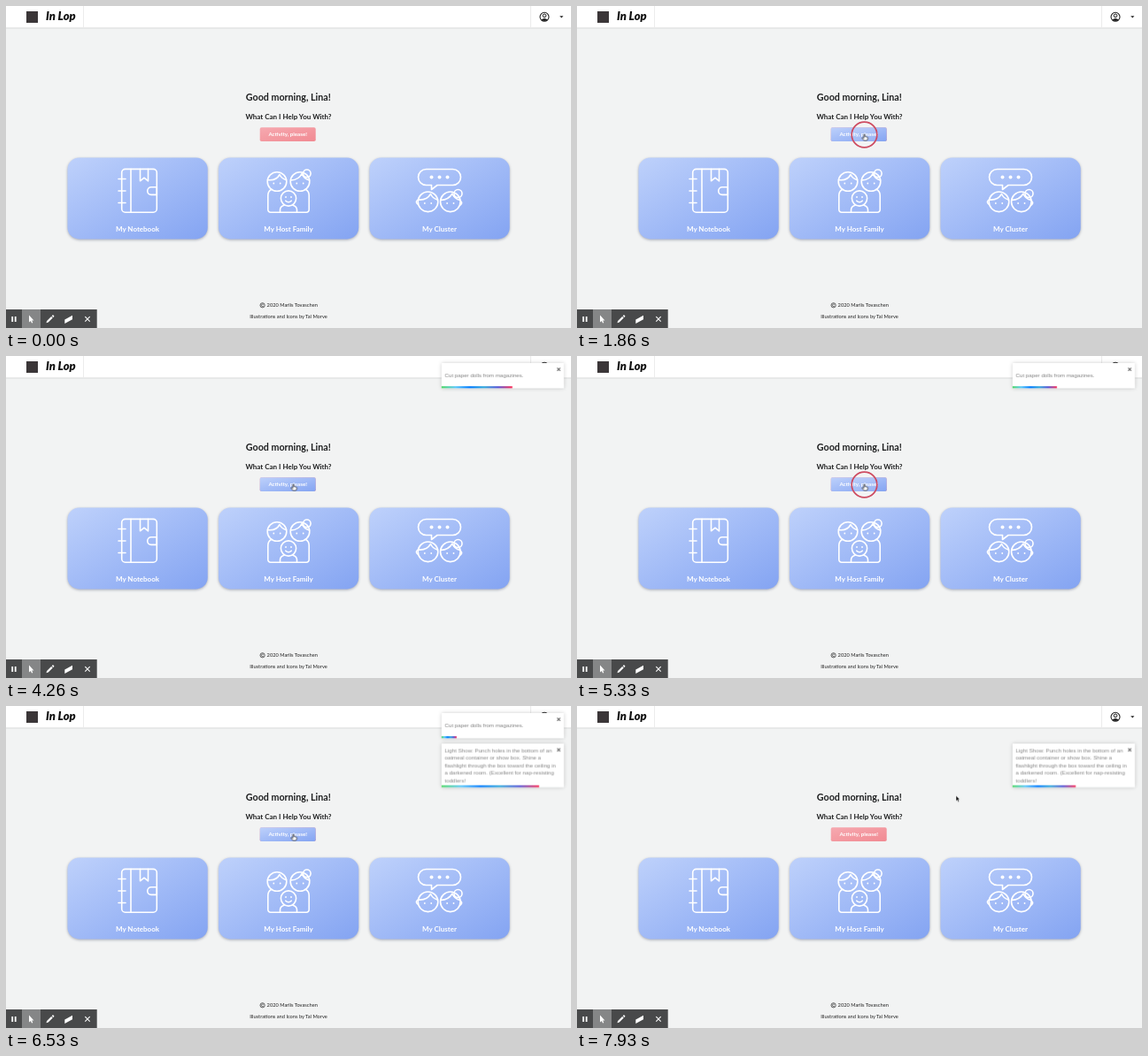
Animation of 638x364 px, one loop 8000 ms. Source, as an HTML page:

```html
<!DOCTYPE html>
<html lang="en">
<head>
<meta charset="utf-8">
<title>Dashboard</title>
<style>
  html, body { margin: 0; width: 100%; height: 100%; overflow: hidden; background: #f2f3f3; }
  svg { display: block; width: 638px; height: 364px; }
  text { font-family: Lato, sans-serif; }
  .bold { font-weight: 700; }
  .mid { text-anchor: middle; }
  .h2 { font-size: 10.7px; fill: #1d1e1f; }
  .h3 { font-size: 8px; fill: #1d1e1f; }
  .label { font-size: 7.97px; fill: #fff; }
  .small { font-size: 5.7px; fill: #222; }
  .brand { font-size: 13px; font-weight: 900; font-style: italic; fill: #111; }
  .card { filter: drop-shadow(0 1px 1.6px rgba(60, 70, 100, .42)); }
  .icon { fill: none; stroke: #fff; stroke-width: 1.6; stroke-linecap: round; stroke-linejoin: round; }
  .dot { fill: #fff; stroke: none; }
  .toast { filter: drop-shadow(0 .6px 2px rgba(0, 0, 0, .2)); }
  .toast text { font-family: "Liberation Sans", Arial, sans-serif; font-size: 6.2px; fill: #858585; }
  .toast path { stroke: #777; stroke-width: 1.3; }
</style>
</head>
<body>
<svg viewBox="0 0 638 364">
  <defs>
    <linearGradient id="blue" x1="0" y1="0" x2="1" y2="1">
      <stop stop-color="#bed1fb"/><stop offset="1" stop-color="#84a4f2"/>
    </linearGradient>
    <linearGradient id="pink" x1="0" y1="0" x2="1" y2="1">
      <stop stop-color="#f6a9b0"/><stop offset="1" stop-color="#f18a92"/>
    </linearGradient>
    <linearGradient id="rainbow">
      <stop stop-color="#4cd964"/><stop offset=".2" stop-color="#5ac8fa"/>
      <stop offset=".4" stop-color="#007aff"/><stop offset=".6" stop-color="#34aadc"/>
      <stop offset=".8" stop-color="#5856d6"/><stop offset="1" stop-color="#ff2d55"/>
    </linearGradient>
  </defs>

  <rect width="638" height="364" fill="#f2f3f3"/>

  <g id="header">
    <rect y="24" width="638" height="1.6" fill="#e0e1e1"/>
    <rect width="638" height="24.3" fill="#fff"/>
    <path d="M87.5 0V24M592.5 0V24" stroke="#e8e8e8" stroke-width=".8"/>
    <rect x="23" y="6" width="13" height="13" fill="#3b3638"/>
    <text class="brand" x="45" y="16.4">In Lop</text>
    <g fill="none" stroke="#222">
      <circle cx="608" cy="12.3" r="5" stroke-width="1.1"/>
      <circle cx="608" cy="10.9" r="1.9" stroke-width="1"/>
      <path d="M604.3 15.6Q608 12.4 611.7 15.6Q608 18.6 604.3 15.6Z" fill="#222" stroke="none"/>
    </g>
    <path d="M625.2 11.3h4.2l-2.1 2.2z" fill="#222"/>
  </g>

  <text class="h2 bold mid" x="318.8" y="106.8">Good morning, Lina!</text>
  <text class="h3 bold mid" x="319" y="128.4">What Can I Help You With?</text>

  <rect x="286.7" y="137.2" width="63" height="15.8" rx="1.8" fill="url(#pink)"/>
  <rect id="hover" x="286.7" y="137.2" width="63" height="15.8" rx="1.8" fill="url(#blue)"/>
  <text class="bold mid" x="318.2" y="147.3" font-size="6.2" fill="#fff">Activity, please!</text>

  <g id="cards"></g>

  <g class="icon">
    <rect x="130.7" y="184.4" width="39.6" height="48.8" rx="4"/>
    <path d="M141 184.4V233.2M127 195.5h8M127 209h8M127 222.500h8M151.500 184.400v13.400l4.500-3.600 4.500 3.600v-13.400M170.300 204.800h-6.300a4.300 4.300 0 0 0 0 8.600h6.300z"/>
  </g>

  <g class="icon">
    <circle cx="306" cy="198.500" r="10.800"/>
    <path d="M295.500 196.500Q305 198 309 190.500Q311 195 316.500 196.500"/>
    <circle cx="332" cy="198.500" r="10.800"/>
    <circle cx="339.800" cy="189.300" r="4.300"/>
    <path d="M321.500 197Q331 196.500 334 189.500Q336 195 342.600 197"/>
    <path d="M299.500 207.500Q295.800 209.500 295.800 214V230.200a3 3 0 0 0 3 3H339.200a3 3 0 0 0 3-3V214Q342.200 209.500 338.500 207.500"/>
    <circle cx="319" cy="217.500" r="8.600"/>
    <path d="M309.500 233v-2.500q0-4 4.500-5.300M328.500 233v-2.500q0-4-4.500-5.300M315.800 220.200q3.200 3.200 6.400 0"/>
    <g class="dot">
      <circle cx="302.300" cy="200.500" r=".9"/><circle cx="309.700" cy="200.500" r=".9"/>
      <circle cx="328.300" cy="200.500" r=".9"/><circle cx="335.700" cy="200.500" r=".9"/>
      <circle cx="316" cy="216" r=".9"/><circle cx="322" cy="216" r=".9"/>
    </g>
  </g>

  <g class="icon">
    <path d="M474.500 184.500H504.500a9 9 0 0 1 0 18H487l-6.500 5v-5h-6a9 9 0 0 1 0-18z"/>
    <circle cx="476.500" cy="221.300" r="11.300"/>
    <path d="M465.500 219Q475 220 479.500 212.500Q482 218 487.500 219M464.500 219.500q-2.500 2.300 .500 4.500"/>
    <circle cx="501.800" cy="221.300" r="11.300"/>
    <circle cx="510.500" cy="212" r="4.500"/>
    <path d="M490.800 219.500Q500 219 504 212Q506 218 513 219.500M513.500 220.500q2.500 2.300-.500 4.500"/>
    <g class="dot">
      <circle cx="480.500" cy="193.500" r="2"/><circle cx="489.500" cy="193.500" r="2"/><circle cx="498.500" cy="193.500" r="2"/>
      <circle cx="472.800" cy="223" r=".9"/><circle cx="480.200" cy="223" r=".9"/>
      <circle cx="498.100" cy="223" r=".9"/><circle cx="505.500" cy="223" r=".9"/>
    </g>
  </g>

  <g fill="none" stroke="#222" stroke-width=".7">
    <circle cx="289.600" cy="338.300" r="2.600"/>
    <path d="M290.700 337.400a1.300 1.300 0 1 0 0 1.800"/>
  </g>
  <text class="small" x="294.600" y="340.300">2020 Marlis Tovaschen</text>
  <text class="small mid" x="319" y="353.300">Illustrations and Icons by Tal Morve</text>

  <g id="toasts"></g>

  <circle id="ring" cx="324.500" cy="145.500" r="14.300" fill="#fff" fill-opacity=".12" stroke="#cd4a60" stroke-width="1.700"/>

  <g id="pointer">
    <path id="arrow" d="M0 0V6.300L1.500 5 2.500 7.200 3.600 6.700 2.600 4.600H4.500Z" fill="#111" stroke="#fff" stroke-width=".5"/>
    <path id="hand" d="M-.7 .6Q0-.5 .7 .6V3Q1.500 2.500 2 3.200Q2.700 2.800 3.100 3.500Q3.900 3.300 3.900 4.200Q3.900 6.300 2.900 7.200H-.500L-2.500 4.700Q-2.600 3.600-1.600 4L-.7 4.700Z" fill="#fff" stroke="#222" stroke-width=".7"/>
  </g>

  <g id="toolbar">
    <rect y="343" width="102.700" height="21" fill="#48494a"/>
    <rect x="18" y="343" width="21" height="21" fill="#858687"/>
    <g fill="#fff">
      <path d="M6.300 351h1.800v6h-1.800zM9.800 351h1.800v6h-1.800z"/>
      <path d="M26 349.500v8l1.900-1.600 1.200 2.700 1.200-.5-1.200-2.600h2.300z"/>
      <path d="M45.500 358.200l.6-2.300 5-5 1.700 1.700-5 5zM51.700 350.300l.8-.8q.5-.4 1 0l.7.700q.4.500 0 1l-.8.800z"/>
      <path d="M66.300 354.500l8.700-4.700v4.400l-8.700 4.700z"/>
    </g>
    <path d="M89.300 351.200l5.400 5.400M94.700 351.200l-5.400 5.400" stroke="#fff" stroke-width="1.100"/>
  </g>
</svg>

<script>
const LOOP = 8000;
const LIFE = 5000;
const BOUNCE = 750;
const OUT = 'cubic-bezier(.215,.61,.355,1)';
const HARD = 'steps(1)';
const $ = id => document.getElementById(id);

// steps: [ms, style, easing to the next step]
function play(el, steps) {
  const frames = steps.map(([ms, style, easing = 'linear']) => ({ ...style, offset: ms / LOOP, easing }));
  frames.push({ ...steps[steps.length - 1][1], offset: 1 });
  el.animate(frames, { duration: LOOP, iterations: Infinity });
}

const at = (x, y) => ({ transform: `translate(${x}px, ${y}px)` });
const slide = (x, opacity = 1) => ({ transform: `translateX(${x}px)`, opacity });

// Shows an element only within the given [from, to] spans
function showDuring(el, spans) {
  const steps = spans.flatMap(([from, to]) => [[from, { opacity: 1 }, HARD], [to, { opacity: 0 }, HARD]]);
  play(el, [[0, { opacity: 0 }, HARD], ...steps]);
}

$('cards').innerHTML = ['My Notebook', 'My Host Family', 'My Cluster'].map((name, i) => {
  const x = 69.5 + i * 170.5;
  return `<rect class="card" x="${x}" y="171.600" width="158.200" height="91.800" rx="13" fill="url(#blue)"/>
    <text class="label bold mid" x="${x + 79}" y="254.800">${name}</text>`;
}).join('');

function addToast(y, height, textY, lines, start) {
  const holder = document.createElementNS('http://www.w3.org/2000/svg', 'g');
  holder.setAttribute('transform', `translate(491.8 ${y})`);
  const text = lines.map((line, i) => `<text x="3.500" y="${textY + i * 8.45}">${line}</text>`).join('');
  holder.innerHTML = `<g class="toast">
    <rect width="138.200" height="${height}" rx=".5" fill="#fff"/>${text}
    <path d="M130.600 5.400l3.400 3.400M134 5.400l-3.400 3.400"/>
    <rect class="bar" y="${height - 2.2}" width="138.200" height="2.200" fill="url(#rainbow)"/>
  </g>`;
  $('toasts').append(holder);

  const end = start + LIFE;
  const steps = [
    [0, slide(1329, 0)],
    [start, slide(1329, 0), OUT],
    [start + BOUNCE * .6, slide(-11.1), OUT],
    [start + BOUNCE * .75, slide(4.4), OUT],
    [start + BOUNCE * .9, slide(-2.2), OUT],
    [start + BOUNCE, slide(0)]
  ];
  const drain = [[0, { transform: 'scaleX(1)' }], [start, { transform: 'scaleX(1)' }]];
  if (end < LOOP) {
    steps.push(
      [end, slide(0), 'ease'],
      [end + BOUNCE * .2, slide(-8.9), 'ease'],
      [end + BOUNCE, slide(886, 0)]
    );
    drain.push([end, { transform: 'scaleX(0)' }]);
  } else {
    const left = 1 - (LOOP - start) / LIFE;
    drain.push([LOOP, { transform: `scaleX(${left})` }]);
  }
  play(holder.firstElementChild, steps);
  play(holder.querySelector('.bar'), drain);
}

addToast(8, 28.4, 16.4, ['Cut paper dolls from magazines.'], 2148);
addToast(42.5, 49.4, 9.9, [
  'Light Show: Punch holes in the bottom of an',
  'oatmeal container or show box. Shine a',
  'flashlight through the box toward the ceiling in',
  'a darkened room. (Excellent for nap-resisting',
  'toddlers!'
], 5516);

play($('pointer'), [
  [0, at(407.5, 147)],
  [500, at(405, 147.5), 'ease-in'],
  [900, at(391, 148)],
  [1180, at(350, 147.5), 'ease-out'],
  [1400, at(324.5, 144.8)],
  [7100, at(324.5, 144.8), 'ease-in-out'],
  [7750, at(428, 101.3)]
]);

const over = [[1180, 7260]];
showDuring($('hover'), over);
showDuring($('hand'), over);
showDuring($('arrow'), [[0, 1180], [7260, LOOP]]);
showDuring($('ring'), [[1860, 2000], [5230, 5370]]);
</script>
</body>
</html>
```
